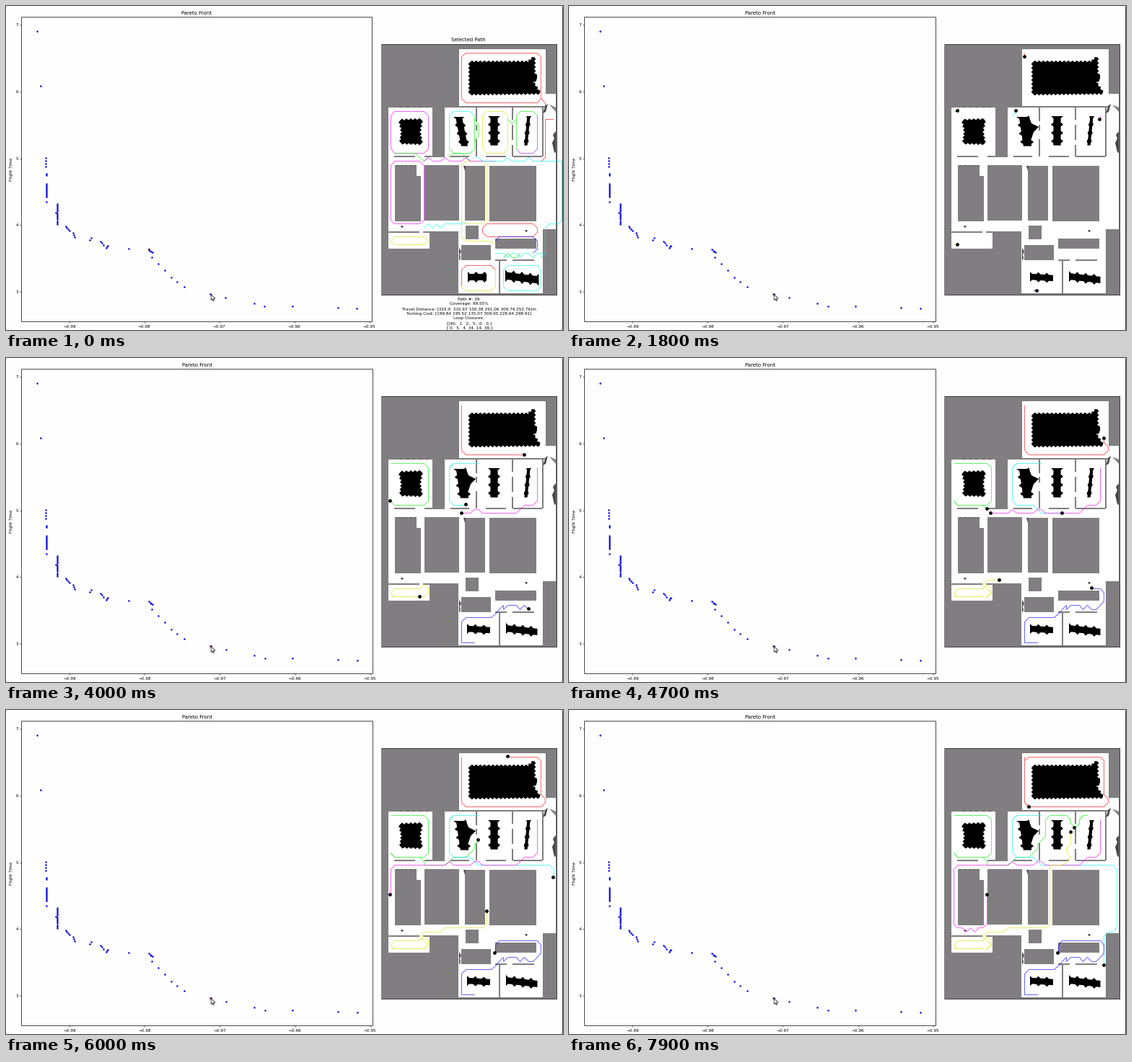
Recreate the animation shown at these times as a matplotlib script. Size 772x450 px, loop 8000 ms.

```python
import numpy as np
import matplotlib.pyplot as plt
from matplotlib.animation import FuncAnimation
from matplotlib.patches import Polygon, Rectangle

W, H, DPI = 772, 450, 100
PT = 72 / DPI
CELL, MAP_X, MAP_Y = 5.8, 521, 53
CLICK, START, FRAMES = 4, 16, 80
SPEED, FIRST_STEP = 1.15, 17.2          # cells per frame, frame of departure
GRAY, DARK = '#807e80', '#484648'
RED, GREEN, CYAN, PINK = '#ff0000', '#00f000', '#00f0f0', '#f000f0'
BLUE, LIME, PURPLE = '#0000ff', '#d8e000', '#9020f0'

plt.rcParams['font.family'] = 'DejaVu Sans'
fig = plt.figure(figsize=(W / DPI, H / DPI), dpi=DPI, facecolor='#fefefe')
ax = fig.add_axes([0, 0, 1, 1])
ax.set_xlim(0, W)
ax.set_ylim(H, 0)
ax.axis('off')


# ---- drawing helpers ----------------------------------------------------
def line(color, xs, ys, lw=1.0, z=5, **kw):
    return ax.plot(xs, ys, color=color, lw=lw * PT, zorder=z, snap=True,
                   solid_joinstyle='miter', solid_capstyle='butt', **kw)[0]


def frame(x0, y0, x1, y1, **kw):
    return line('black', [x0, x1, x1, x0, x0], [y0, y0, y1, y1, y0], **kw)


def box(x0, y0, x1, y1, color=GRAY, z=2):
    ax.add_patch(Rectangle((x0, y0), x1 - x0, y1 - y0, fc=color, lw=0, zorder=z))


def blob(pts, color='black', z=3):
    return ax.add_patch(Polygon(pts, fc=color, lw=0, zorder=z))


def label(x, y, s, size=5.8, **kw):
    kw = {'ha': 'center', 'va': 'center_baseline', **kw}
    return ax.text(x - 0.4, y - 0.4, s, fontsize=size * PT, zorder=6, **kw)


def saw(pts, amp=2.4):
    """Teeth one cell apart along every edge of an outline."""
    pts, out = np.array(pts, float), []
    for a, b in zip(pts, np.roll(pts, -1, axis=0)):
        d = b - a
        size = np.hypot(*d)
        n = max(1, round(size / CELL))
        for i in range(n):
            out += [a + d * i / n,
                    a + d * (i + 0.5) / n + amp * np.array([d[1], -d[0]]) / size]
    return out


def core(x0, y0, x1, y1, lean=0, flat=False):
    """Ragged blob: a column (or a row if flat) whose width swings cell by cell."""
    if flat:
        x0, y0, x1, y1 = y0, x0, y1, x1
    v = np.arange(y0, y1 + 1, CELL / 2)
    k = np.arange(len(v))
    half = (x1 - x0 - abs(lean)) / 2 * (0.7 + 0.2 * np.cos(np.pi * k / 2) + 0.1 * (-1.0) ** k)
    mid = (x0 + x1) / 2 + lean * np.linspace(-0.5, 0.5, len(v))
    pts = np.c_[np.r_[mid - half, (mid + half)[::-1]], np.r_[v, v[::-1]]]
    return blob(pts[:, ::-1] if flat else pts)


def walk(i, j, moves):
    """Cells visited from (i, j) by compass moves such as 'e4 ne2 s'."""
    path = [(i, j)]
    for move in moves.split():
        d = move.rstrip('0123456789')
        for _ in range(int(move[len(d):] or 1)):
            i += ('e' in d) - ('w' in d)
            j += ('s' in d) - ('n' in d)
            path.append((i, j))
    return np.array(path) * CELL + (MAP_X, MAP_Y)


def route(color, i, j, moves):
    p = walk(i, j, moves)
    return line(color, p[:, 0], p[:, 1], alpha=0.6)


def loop(i0, j0, i1, j1, color, color2=None):
    """Round trip inside a room with cut corners, in one or two colours."""
    w, h = i1 - i0 - 2, j1 - j0 - 2
    return [route(color, i0, j1 - 1, f'n{h} ne e{w} se'),
            route(color2 or color, i1, j0 + 1, f's{h} sw w{w} nw')]


# ---- scatter plot -------------------------------------------------------
LEFT, TOP, BOTTOM = 21, 15, 438
runs = [(4, 55, 211, 55, 223), (2, 56, 233, 56, 235), (10, 56, 247, 56, 265),
        (1, 56, 272.5, 56, 272.5), (14, 71.8, 275, 71.8, 303.5),
        (4, 83, 306, 88, 312), (3, 93.5, 315.5, 95.5, 321), (2, 116.5, 325, 118, 322.5),
        (3, 131.5, 327, 135, 332.5), (3, 139, 336, 141, 333.5), (4, 198, 338.7, 203, 342.7),
        (4, 202.5, 349.3, 229.5, 377), (2, 237, 383.7, 247, 390),
        (2, 283.5, 400.5, 304.5, 405), (2, 344, 413.7, 358.5, 417.4),
        (2, 460, 419.5, 486.2, 420)]
cloud = np.vstack([np.linspace(r[1:3], r[3:], r[0]) for r in runs]
                  + [[(43.5, 35), (48, 111), (69, 287), (170, 337), (397, 417.4)]])

plot_frame = frame(LEFT, TOP, 507, BOTTOM, lw=0.7)
dots = ax.plot([], [], 'o', color='#0000e0', ms=2.5 * PT, mew=0, zorder=6)[0]
mark = ax.plot([], [], 'x', color='#600010', ms=2.8 * PT, mew=0.7 * PT, zorder=7)[0]
plot_title = label(264.5, 10, 'Pareto Front', 6.95)
label(8.4, 227, 'Flight Time', rotation=90, va='center')
x_ticks = []
for k in range(5):
    y = 26.3 + 92.6 * k
    line('black', [LEFT - 2, LEFT], [y, y], lw=0.6)
    label(17.8, y + 0.6, str(7 - k), ha='right')
    x = 88.2 + 103.85 * k
    x_ticks.append((x, line('black', [x, x], [BOTTOM, BOTTOM + 2], lw=0.6),
                    label(x, 445.5, f'\u2212{0.99 - 0.01 * k:.2f}')))


def layout(right):
    """Stretch the plot to a given right edge."""
    def move(x):
        return LEFT + (x - LEFT) * (right - LEFT) / 486

    plot_frame.set_xdata([LEFT, right, right, LEFT, LEFT])
    dots.set_data(move(cloud[:, 0]) - 0.5, cloud[:, 1] - 0.5)
    plot_title.set_x((LEFT + right) / 2)
    for x, tick, text in x_ticks:
        tick.set_xdata([move(x)] * 2)
        text.set_x(move(x) - 0.4)


arrow = np.array([(0, 0), (0, 8.3), (1.9, 6.7), (3, 9.4), (4.4, 8.8), (3.2, 6.2), (5.7, 6)])
ax.add_patch(Polygon(arrow + (284.2, 400.3), fc='white', ec='black', lw=0.7 * PT, zorder=8))
line('#404040', [W - 1, W - 1], [0, H])

# ---- floor map ----------------------------------------------------------
box(MAP_X, MAP_Y, 764, 402, z=0)
frame(520, 53, 763, 401, lw=0.7, alpha=0.7)
for room in [(628, 60, 748, 140), (530, 141, 591, 210), (608, 141, 744, 210),
             (743, 122, 762, 210), (530, 209, 762, 310), (530, 309, 587, 337),
             (587, 309, 628, 313), (627, 309, 744, 399)]:
    box(*room, color='white', z=1)
for block in [(539, 221, 569, 299), (569, 236, 575, 299), (580, 221, 628, 298),
              (636, 222, 664, 298), (670, 222, 735, 299), (637, 305, 655, 324),
              (631, 332, 672, 353), (678, 323, 735, 337)]:
    box(*block)


def walls(pos, *spans, upright=False):
    for a, b in spans:
        box(*((pos, a, pos + 2, b) if upright else (a, pos, b, pos + 2)))


walls(139, (628, 748))
walls(208, (538, 567), (580, 608), (616, 642), (665, 693), (703, 743))
walls(313, (530, 573), (578, 627))
walls(352, (678, 694), (702, 732))
walls(651, (141, 160), (165, 173), (185, 209), upright=True)
walls(701, (141, 158), (165, 186), (193, 209), upright=True)
walls(743, (141, 209), upright=True)
walls(683, (353, 399), upright=True)
for k in range(5):
    line(DARK, [545 + 9 * k, 549 + 9 * k], [140, 140], lw=0.8)
    line(DARK, [541 + 6 * k, 544 + 6 * k], [221, 221], lw=0.8)
    line(GRAY, [591, 591], [146 + 13 * k, 150 + 13 * k])

# rubble
blob([(744, 149), (748, 138), (751, 136), (748, 147)], DARK)
blob([(753, 137), (762, 141), (762, 147)], GRAY)
blob([(762, 174), (758, 179), (760, 184), (757, 190), (760, 203), (762, 204)], DARK)
blob([(628, 336), (631, 341), (629, 345), (630, 350), (628, 354)], DARK)
blob([(634, 222), (637, 222), (636, 229)], DARK)
for x, y in [(549, 306), (721, 312)]:
    blob([(x - 2, y - 1), (x + 2, y), (x, y + 2)])

# unseen cores of the rooms
blob(saw([(643, 78), (724, 78), (732, 71), (732, 93), (736, 100), (730, 106),
          (740, 121), (643, 122)]))
blob(saw([(546, 159), (576, 158), (573, 175), (576, 191), (547, 190), (549, 175)]))
core(668, 153, 685, 195)
core(717, 153, 728, 193, lean=-4)
old_cores = [core(620, 154, 643, 194, lean=8),
             core(640, 369, 668, 384, flat=True),
             core(692, 366, 740, 389, lean=6, flat=True)]
new_cores = [core(620, 154, 645, 194, lean=6),
             blob([(630, 159), (637, 152), (641, 163), (651, 168), (644, 175), (640, 187)]),
             core(639, 369, 670, 385, lean=2, flat=True),
             core(693, 368, 737, 388, lean=5, flat=True)]

# ---- first selection ----------------------------------------------------
first = (loop(19, 2, 38, 14, RED) + loop(2, 16, 11, 26, PINK)
         + loop(16, 16, 22, 26, CYAN, GREEN) + loop(24, 16, 30, 26, LIME)
         + loop(32, 16, 37, 26, GREEN, PURPLE) + loop(2, 28, 10, 43, PINK)
         + loop(19, 28, 25, 43, LIME) + loop(2, 46, 11, 48, LIME)
         + loop(24, 43, 37, 46, RED) + loop(19, 53, 27, 59, RED, LIME)
         + loop(29, 53, 38, 59, CYAN))
first += [
    route(RED, 38, 13, 'se s'), route(RED, 41, 18, 'w2 s9 sw'),
    route(GREEN, 3, 26, 'e5 se2 ne'), route(GREEN, 16, 26, 's ne e2 se2'),
    route(GREEN, 22, 18, 'se s3 sw'), route(GREEN, 30, 18, 'se ne'),
    route(PINK, 10, 28, 'ne se e2 ne se e3 ne se e6'),
    route(CYAN, 22, 27, 'e1 se e5 ne se e3 ne se e7 s14 sw w2 sw s6 sw'),
    route(CYAN, 10, 44, 'ne se ne se ne e5'),
    route(LIME, 19, 42, 's4 se e6 se'),
    route(BLUE, 27, 47, 'ne e8 se s2 sw'),
    route(CYAN, 27, 50, 'e2 se ne e1 se ne e1 se ne e2'),
    route(GREEN, 29, 51, 'ne se e1 ne'),
]

# ---- robots -------------------------------------------------------------
plans = [
    (RED, 19, 2, 's11 se e18 ne n nw n8 nw w17 sw s10 se'),
    (GREEN, 2, 16, 'e8 se s8 sw w7 nw se e6 se s e5 ne2 e3 ne2 n ne2 n4 ne e4 '
                   'se s se ne n ne e w sw s sw'),
    (CYAN, 16, 17, 'ne e6 w6 sw s8 se e4 se2 e17 se s14 sw w sw s7 '
                   's6 sw w7 nw n4 ne e7'),
    (PINK, 37, 17, 's8 sw w2 sw2 w8 nw w sw w4 nw sw w12 sw s13 se e se ne se ne e '
                   'ne n7'),
    (LIME, 2, 48, 'e8 ne n nw sw w6 sw se e7 ne nw2 ne e4 ne e9 ne n14 e3 ne2 nw n '
                  'ne n6 nw w4 sw s8 se e4'),
    (BLUE, 21, 59, 'e w3 n5 ne e6 ne3 s ne e2 se ne se e ne2 n2 nw w9 sw s2'),
]


class Robot:
    def __init__(self, color, i, j, moves):
        self.path = walk(i, j, moves)
        self.trail = route(color, i, j, moves)
        self.dot = ax.plot([], [], 'o', color='black', ms=4.8 * PT, mew=0, zorder=7)[0]

    def show(self, cells):
        done = self.path[:cells + 1]
        self.trail.set_data(done[:, 0], done[:, 1])
        self.dot.set_data(done[-1:, 0] - 0.5, done[-1:, 1] - 0.5)


robots = [Robot(*plan) for plan in plans]

# ---- captions -----------------------------------------------------------
map_title = label(641.7, 47, 'Selected Path', 6.95)


def caption(number, coverage, travel, turning, top, bottom):
    return [f'Path #: {number}', f'Coverage: {coverage}%', f'Travel Distance: [{travel}]m',
            f'Turning Cost: [{turning}]', 'Loop Closures:', f'[[{top}]', f' [ {bottom}]']


first_text = caption(26, 98.55, '325.9  310.67 100.38 291.06 309.79 252.76',
                     '199.84 195.52 135.07 309.05 228.64 298.91',
                     '40.  1.  2.  5.  0.  0.', '0.  5.  4. 34. 14. 38.')
second_text = caption(41, 97.11, '271.4  262.85 277.13 284.9  268.36 225.71',
                      '148.26 187.91 163.44 201.72 215.38 176.05',
                      '31.  0.  2.  3.  0.  0.', '0. 12.  5. 21.  8. 17.')
captions = [label(642, 407 + 6.65 * k, s) for k, s in enumerate(first_text)]


def draw(n):
    old, running = n < CLICK, n >= START
    layout(507 if old else 508)
    mark.set_data([197.5 if old else 283.4], [338.2 if old else 400])
    for item in first + old_cores:
        item.set_visible(old)
    for item in new_cores:
        item.set_visible(not old)
    map_title.set_visible(not running)
    for text, s in zip(captions, first_text if old else second_text):
        text.set_text(s)
        text.set_visible(not running)
    cells = max(0, round(SPEED * (n - FIRST_STEP))) if running else 999
    for robot in robots:
        robot.show(cells)
        robot.trail.set_visible(not old)
        robot.dot.set_visible(running)
    return []


anim = FuncAnimation(fig, draw, frames=FRAMES, interval=100, repeat=True,
                     repeat_delay=0, blit=False, init_func=lambda: draw(0))
plt.show()
```
